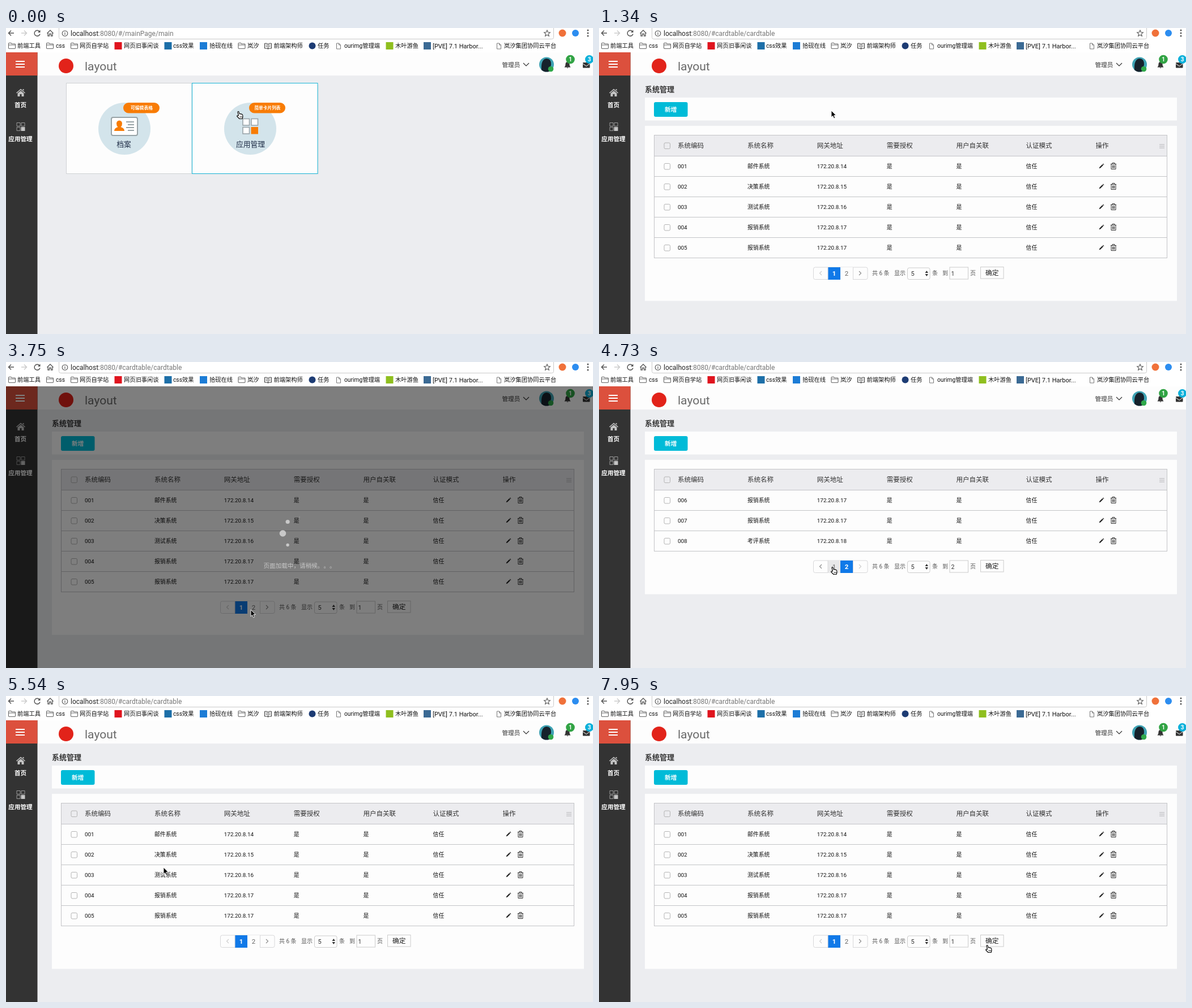
These frames come from a looping animation (1036 px wide and 541 px high, 8000 ms). An HTML page:

```html
<!DOCTYPE html>
<html lang="zh-CN">
<head>
<meta charset="utf-8">
<title>系统管理</title>
<style>
html, body { margin: 0; width: 100%; height: 100%; overflow: hidden; background: #ecedf0; }
svg { display: block; width: 100%; height: 100%; }
text {
  font-family: Roboto, "Noto Sans CJK SC", "Noto Sans CJK", sans-serif;
  text-spacing-trim: space-all;
  white-space: pre;
}
</style>
</head>
<body>
<svg id="stage" viewBox="0 0 1036 541" xmlns="http://www.w3.org/2000/svg"></svg>
<script>
const LOOP = 8000;

// time, cursor, x, y, view, extras
const STEPS = [
  [0, 'hand', 410, 147, 'home'],
  [750, 'arrow', 410, 146, 'empty', { load: 1 }],
  [980, 'arrow', 410, 146, 'empty', { load: 1 }],
  [1130, 'arrow', 410, 146, 1, { load: 1 }],
  [1340, 'arrow', 410, 146, 1],
  [1790, 'arrow', 398, 172, 1],
  [1940, 'arrow', 379, 252, 1],
  [2090, 'arrow', 392, 330, 1],
  [2250, 'arrow', 440, 392, 1],
  [2400, 'arrow', 488, 430, 1],
  [2560, 'hand', 455, 437, 1],
  [2710, 'hand', 432, 438, 1, { hover: 2 }],
  [3460, 'arrow', 432, 438, 1, { hover: 2 }],
  [3600, 'arrow', 432, 438, 1, { load: 1 }],
  [3780, 'arrow', 432, 438, 2, { load: 1 }],
  [3960, 'arrow', 432, 438, 2],
  [4260, 'arrow', 430, 422, 2],
  [4420, 'arrow', 422, 388, 2],
  [4570, 'hand', 414, 366, 2, { hover: 1 }],
  [4730, 'hand', 412, 362, 2, { hover: 1 }],
  [5180, 'arrow', 412, 362, 2, { load: 1 }],
  [5340, 'arrow', 380, 348, 1, { load: 1 }],
  [5540, 'arrow', 278, 303, 1],
  [5680, 'arrow', 190, 268, 1],
  [5840, 'arrow', 135, 249, 1],
  [6000, 'arrow', 119, 243, 1],
  [6450, 'arrow', 119, 243, 1, { check: .5 }],
  [6600, 'arrow', 119, 243, 1, { check: 1 }],
  [7050, 'arrow', 119, 243, 1, { check: .5 }],
  [7200, 'arrow', 300, 255, 1],
  [7350, 'arrow', 620, 255, 1],
  [7500, 'hand', 904, 246, 1],
  [7650, 'arrow', 850, 320, 1],
  [7800, 'arrow', 735, 410, 1],
  [7950, 'hand', 685, 440, 1]
];

const HEADS = ['系统编码', '系统名称', '网关地址', '需要授权', '用户自关联', '认证模式', '操作'];
const ROWS = {
  empty: [],
  1: [['邮件', 14], ['决策', 15], ['测试', 16], ['报销', 17], ['报销', 17]],
  2: [['报销', 17], ['报销', 17], ['考评', 18]]
};

// Text is placed by its left edge and the middle of its line.
const text = (x, cy, s, size, fill = '#333', more = '') =>
  `<text x="${x}" y="${cy + size * .37}" font-size="${size}" fill="${fill}" ${more}>${s}</text>`;
const mid = (x, cy, s, size, fill, more = '') => text(x, cy, s, size, fill, 'text-anchor="middle" ' + more);
const rect = (x, y, w, h, fill, more = '') =>
  `<rect x="${x}" y="${y}" width="${w}" height="${h}" fill="${fill}" ${more}/>`;
const frame = (x, y, w, h, stroke = '#ccc', r = 0, fill = '#fdfdfd') =>
  rect(x, y, w, h, fill, `rx="${r}" stroke="${stroke}"`);
const disc = (x, y, r, fill, more = '') => `<circle cx="${x}" cy="${y}" r="${r}" fill="${fill}" ${more}/>`;
const line = (d, stroke = '#555', w = 1, more = '') =>
  `<path d="${d}" fill="none" stroke="${stroke}" stroke-width="${w}" ${more}/>`;
const shape = (d, fill, more = '') => `<path d="${d}" fill="${fill}" ${more}/>`;
const at = (x, y, s) => `<g transform="translate(${x} ${y})">${s}</g>`;
const BOLD = 'font-weight="700"';

const folder = x => at(x, 26, line('M.5 9V1.5Q.5.5 1.5.5H5L6 2H11.5Q12.5 2 12.5 3V9Q12.5 10.5 11.5 10.5H1.5Q.5 10.5.5 9ZM.5 4H12.5', '#666', 1.1));
const sheet = x => at(x, 26.5, line('M.5.5H4.5L7.5 3.5V10.5H.5ZM4.5.5V3.5H7.5', '#777'));
const book = x => at(x, 26.5, line('M6.5 2Q4 0 .5.8V9.5Q4 8.8 6.5 10.5Q9 8.8 12.5 9.5V.8Q9 0 6.5 2V10.5M2.5 3.5H4.5M2.5 6H4.5M8.5 3.5H10.5M8.5 6H10.5', '#333'));
const tile = fill => x => rect(x, 25, 13, 13, fill);

const BOOKMARKS = [
  [folder, 4, 20, '前端工具'], [folder, 71, 88, 'css'], [folder, 114, 130, '网页自学站'],
  [tile('#e0141e'), 191.5, 208, '网页旧事闲谈'], [tile('#1d6fa8'), 279.5, 295, 'css效果'],
  [tile('#1c7cd6'), 342, 359, '拾砚在线'], [folder, 409.5, 426, '岚汐'], [book, 456, 472.5, '前端架构师'],
  [x => disc(x + 6, 31.5, 6, '#1d3c74'), 534.5, 550, '任务'], [sheet, 583, 597, 'ourimg管理端'],
  [tile('#8fbf1f'), 670.5, 687, '木叶游鱼'], [tile('#3b6a94'), 737, 753, '[PVE] 7.1 Harbor...', 11],
  [sheet, 866, 879, '岚汐集团协同云平台']
];

function browser(path) {
  return rect(0, 0, 1036, 43, '#fff') +
    frame(93.5, -4, 873, 23.5, '#c9c9c9', 3, '#fff') +
    line('M14 9H4.5M9 4.5 4.5 9 9 13.5', '#555', 1.5) +
    line('M27 9H36.5M32 4.5 36.5 9 32 13.5', '#ccc', 1.5) +
    line('M59 6A5 5 0 1 0 60 10.5', '#555', 1.5) + shape('M60.5 3.5V8H56Z', '#555') +
    line('M72.5 9.5 78 4 83.5 9.5M74 8.5V14H76.5V10.5H79.5V14H82V8.5', '#555', 1.3) +
    disc(104, 9.5, 4.8, 'none', 'stroke="#555" stroke-width="1.1"') + line('M104 8.7V12M104 6.5V7.7', '#555', 1.2) +
    text(114, 9.5, `localhost<tspan fill="#777">:8080/#${path}</tspan>`, 12, '#222') +
    line('M955 4 956.5 7.6 960.3 7.9 957.4 10.4 958.3 14.2 955 12.1 951.7 14.2 952.6 10.4 949.7 7.9 953.5 7.6Z', '#555', 1.1) +
    disc(982, 9, 6.5, '#f0713a') + disc(1005, 9, 6, '#2c8df0') +
    [4, 9, 14].map(y => disc(1027, y, 1.5, '#555')).join('') +
    BOOKMARKS.map(([icon, x, tx, label, size = 10.25]) => icon(x) + text(tx, 31.5, label, size, '#111')).join('');
}

function shell() {
  return rect(55.5, 43, 981, 41, '#fdfdfd') + rect(0, 43, 55.5, 498, '#333') + rect(0, 43, 55.5, 41, '#dc503d') +
    line('M17 59H33M17 64H33M17 69H33', '#fff', 2) +
    shape('M18 114.5 26 107.5 34 114.5 33 115.6 26 109.6 19 115.6ZM20.5 115.5 26 111 31.5 115.5V121H27.5V117H24.5V121H20.5ZM29.5 108H31.5V111L29.5 109.5Z', '#c4c4c4') +
    mid(25.5, 136, '首页', 10.6, '#fff', BOLD) +
    line('M19 167.5H25V173.5H19ZM27 167.5H33V173.5H27ZM19 175.5H25V181.5H19Z', '#999') + rect(26.5, 175, 7, 7, '#c4c4c4') +
    mid(25.5, 196, '应用管理', 10.6, '#fff', BOLD) +
    disc(106, 67, 13, '#e2231a') +
    text(139, 67, 'layout', 21, '#6a6a6a') +
    text(875.5, 65, '管理员', 10.6, '#333') + line('M913 62 918 67 923 62', '#333', 1.2) +
    disc(954, 64.5, 13, '#3fa3b4') +
    shape('M945 73Q944 55 954 54Q962 54 962 64Q962 68 959 70Q963 72 963 74A13 13 0 0 1 945 74Z', '#16222c') +
    disc(961.5, 72.5, 4.8, '#2fa84a') +
    shape('M985.5 69.5Q987.5 68 987.5 64Q987.5 60 991 60Q994.5 60 994.5 64Q994.5 68 996.5 69.5ZM989.5 70H992.5Q991 72.2 989.5 70Z', '#333') +
    disc(996, 55.5, 7.8, '#31a344') + mid(996, 55.5, '1', 10, '#fff', BOLD) +
    rect(1018, 61, 12.5, 9.5, '#333', 'rx="1"') + line('M1018 63 1024.2 67.5 1030.5 63', '#fdfdfd') +
    disc(1029.5, 55.5, 7.5, '#0cb0da') + mid(1029.5, 55.5, '3', 10, '#fff', BOLD);
}

function card(x, tag, tagSize, icon, active) {
  return (active ? rect(x + 3, 100, 221.5, 158.5, '#e2e6e8') : '') +
    frame(x + .5, 97.5, 221.5, 160, active ? '#19b5d6' : '#cfd2d4') +
    at(x + 103, 178, disc(0, 0, 46, '#d3e4eb') + rect(-2, -46, 64, 18.5, '#f87c05', 'rx="9.2"') +
      mid(30.5, -36.7, tag, tagSize, '#fff', BOLD) + icon);
}

const badgeIcon = rect(-23, -20, 46, 32, '#fff', 'rx="3" stroke="#98a3a7" stroke-width="2"') +
  shape('M-14 -9A5 5.5 0 0 1 -4 -9Q-4 -5 -6.5 -3Q0 -1 0 4H-18Q-18 -1 -11.5 -3Q-14 -5 -14 -9Z', '#f87c05') +
  line('M3 -12H17M6 -7H17M3 -2H17M6 3H17', '#98a3a7', 2);
const gridIcon = [[-13, -17.5], [2, -17.5], [-13, -2.5]].map(([x, y]) =>
  rect(x, y, 11.5, 11.5, '#fff', 'stroke="#99a4a9" stroke-width="1.6"')).join('') + rect(1.5, -3, 12.5, 12.5, '#f87c05');

function home() {
  return card(106, '可编辑表格', 7.8, badgeIcon) + mid(208, 205.5, '档案', 12.8, '#1d2b45') +
    card(328, '简单卡片列表', 7.7, gridIcon, true) + mid(431.5, 205.5, '应用管理', 12.8, '#1d2b45');
}

const checkbox = (y, on = 0, fill = '#fdfdfd') => frame(115, y - 5, 10.5, 10.5, '#b4b4b4', 2, fill) +
  (on ? `<g opacity="${on}">` + rect(114.5, y - 5.5, 11.5, 11.5, '#3b8bf5', 'rx="2"') +
    line(`M117 ${y + .5} 119.5 ${y + 3} 123.5 ${y - 3}`, '#fff', 1.6) + '</g>' : '');

const pencil = shape('M-4.3 4.3 -3.6 2 1.4 -3 3 -1.4 -2 3.6ZM2 -3.6 2.8 -4.4 4.4 -2.8 3.6 -2Z', '#222');
const trash = line('M-5 -3.5H5M-2 -3.5V-5.5H2V-3.5M-4 -3.5V5.5H4V-3.5M-1.7 -1.5V3.8M0 -1.5V3.8M1.7 -1.5V3.8', '#333');

function table(page, check) {
  const rows = ROWS[page];
  if (!rows.length) return line('M97.5 189.5H1002.5', '#bbb');
  const colX = i => 139 + i * 122.9;
  let s = frame(97.5, 189.5, 905, 37 + rows.length * 36, '#c3c4c7') +
    frame(97.5, 189.5, 905, 37, '#c3c4c7', 0, '#ececef') + checkbox(208, 0, 'none') +
    line('M989 206H998M989 209H998M989 212H998', '#b5b5b8') +
    HEADS.map((h, i) => text(colX(i), 208, h, 11.5)).join('');
  rows.forEach(([name, host], i) => {
    const y = 244 + i * 36;
    const id = '00' + (i + (page === 2 ? 6 : 1));
    s += line(`M97.5 ${y + 18.5}H1002.5`, '#c3c4c7') + checkbox(y + .5, i ? 0 : check) +
      [id, name + '系统', '172.20.8.' + host, '是', '是', '信任'].map((v, c) => text(colX(c), y, v, 9.9, '#111')).join('') +
      at(887, y, pencil) + at(908, y, trash);
  });
  return s;
}

function pager(page, hover) {
  const current = page === 2 ? 2 : 1;
  const cell = n => {
    const x = 382 + n * 22, on = n === current;
    return rect(x, -10.5, 22, 22, on ? '#1079e8' : n === hover ? '#e8e8e9' : '#fdfdfd') +
      mid(x + 11, .3, n, 11.5, on ? '#fff' : '#666', on ? BOLD : '');
  };
  const shade = end => current === end ? '#ccc' : '#888';
  return frame(378.5, -10.5, 95.5, 21.5, '#d8d8da', 3) + cell(1) + cell(2) +
    line('M404 -10.5V11M448.5 -10.5V11', '#d8d8da') +
    line('M393 -3.5 389.5 0 393 3.5', shade(1), 1.1) + line('M459 -3.5 462.5 0 459 3.5', shade(2), 1.1) +
    text(482, 0, '共 6 条', 10, '#555') + text(521, 0, '显示', 10, '#555') +
    frame(544.5, -9.5, 39.5, 20.5, '#ccc', 3) + text(550.5, .8, '5', 11, '#333') +
    shape('M575.5 -.5 578.3 -4.5 581 -.5ZM575.5 1.5 578.3 5.5 581 1.5Z', '#333') +
    text(588, 0, '条', 10, '#555') + text(606, 0, '到', 10, '#555') +
    frame(619, -10.5, 32.5, 21) + text(621.5, .3, current, 10.5, '#333') + text(655, 0, '页', 10, '#555') +
    frame(673.5, -11, 40.5, 20.5) + mid(693.7, -.5, '确定', 11.7, '#222');
}

function list(page, { hover, check }) {
  const n = ROWS[page].length;
  const bottom = n ? 226.5 + n * 36 : 189.5;
  return text(81, 108, '系统管理', 13, '#333', BOLD) + rect(81, 123, 939, 40.5, '#fdfdfd') +
    rect(97, 131, 59.5, 26, '#00bbd8', 'rx="3"') + mid(126.7, 144, '新增', 10.6, '#fff', BOLD) +
    rect(81, 173, 939, bottom + 76 - 173, '#fdfdfd') + table(page, check) + at(0, bottom + 27, pager(page, hover));
}

function loader(time) {
  const peak = 53 + (time - 980) * .36;
  let s = rect(0, 43, 1036, 498, '#000', 'opacity=".5"');
  for (let a = 0; a < 360; a += 45) {
    const gap = Math.abs((((a - peak + 180) % 360) + 360) % 360 - 180);
    const r = 6.2 * Math.max(0, 1 - gap / 92);
    const rad = a * Math.PI / 180;
    s += disc(518 + 29.5 * Math.sin(rad), 303 - 29 * Math.cos(rad), r, '#c8c8c8');
  }
  return s + text(454.5, 360.5, '页面加载中，请稍候。。。', 10.6, '#c8c8c8');
}

const CURSORS = {
  arrow: shape('M0 0V11.8L2.7 9.3 4.7 13.8 6.7 12.9 4.8 8.5H8.4Z', '#000', 'stroke="#fff" stroke-width=".9"'),
  hand: at(-3, 0, shape('M3.5 8 2 2.2Q1.8.6 3 .6Q4 .6 4.3 2L5 5Q6.2 4 7 5.2Q8.2 4.4 8.8 5.6Q10.3 5.2 10.7 7L11 10 10 13.5H5L1 9.5Q.2 8 1.6 7.7Z', '#fff', 'stroke="#000" stroke-width="1.1" stroke-linejoin="round"') +
    line('M6 9V11.5M7.7 9V11.5M9.3 9V11.5', '#000', .7))
};

function draw([time, cursor, x, y, view, extras = {}]) {
  const isHome = view === 'home';
  return rect(0, 0, 1036, 541, '#ecedf0') + shell() + (isHome ? home() : list(view, extras)) +
    (extras.load ? loader(time) : '') + browser(isHome ? '/mainPage/main' : 'cardtable/cardtable') +
    at(x, y, CURSORS[cursor]);
}

const stage = document.getElementById('stage');
const start = performance.now();
let shown = null;

function tick() {
  const t = (performance.now() - start) % LOOP;
  const step = STEPS.findLast(s => s[0] <= t) || STEPS[0];
  if (step !== shown) {
    shown = step;
    stage.innerHTML = draw(step);
  }
  requestAnimationFrame(tick);
}
tick();
</script>
</body>
</html>
```
